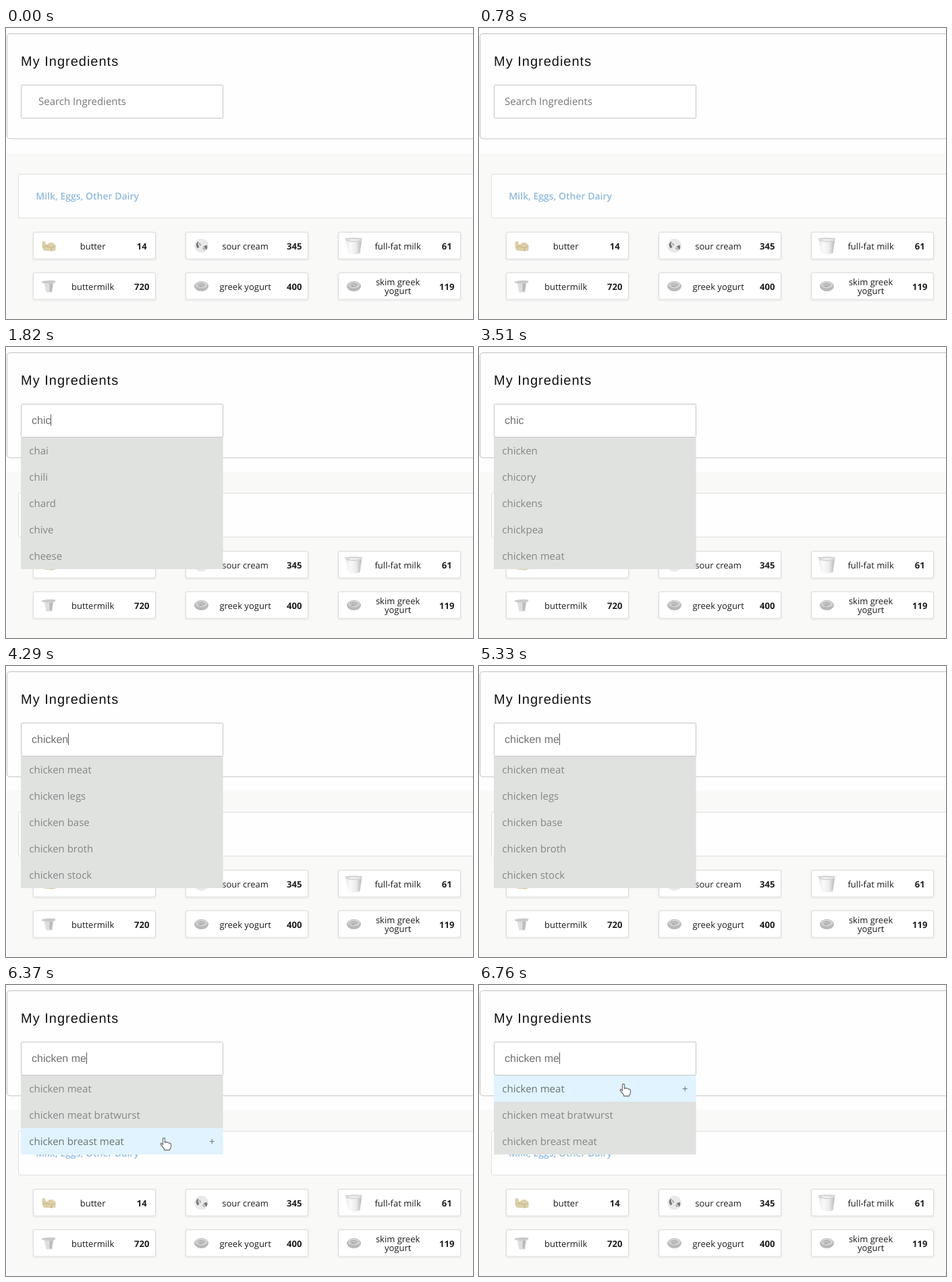
Recreate the animation shown at these times as an HTML page. Size 692 by 431 pixels, loop 6890 ms.

```html
<!DOCTYPE html>
<html lang="en">
<head>
<meta charset="utf-8">
<title>My Ingredients</title>
<style>
  html, body { margin: 0; width: 100%; height: 100%; overflow: hidden; background: #fefefe; }
  svg { display: block; font: 15px "Open Sans", sans-serif; text-rendering: geometricPrecision; }
  text { white-space: pre; }
  .heading { font: 20px "Liberation Sans", Arial, sans-serif; letter-spacing: 1px; fill: #111; }
  .typed { font: 16px "Liberation Sans", Arial, sans-serif; fill: #707070; }
  .placeholder { fill: #777; }
  .section { font-size: 14px; font-weight: 600; fill: #8fb9dc; }
  .tile text { font-size: 13px; fill: #1c1c1c; text-anchor: middle; }
  .tile .count { font-weight: 700; }
  .tile .card { fill: #fff; stroke: #dcdcdc; }
  .shade { fill: #000; opacity: .035; }
  #list text { fill: #838785; }
  #list .hover text { fill: #6c7478; }
</style>
</head>
<body>
<svg width="692" height="431" viewBox="0 0 692 431">
  <defs>
    <linearGradient id="glass">
      <stop offset="0" stop-color="#e6e6e6"/>
      <stop offset=".3" stop-color="#fafafa"/>
      <stop offset=".65" stop-color="#ececec"/>
      <stop offset="1" stop-color="#b4b4b4"/>
    </linearGradient>
    <g id="butter">
      <path d="M-10-6L-6-7-4-1 0-4 5-5 10-1V7L4 8-8 7-10 2Z" fill="#dccfa9"/>
      <path d="M-9 2L-3 1 4 3 10 1M4 3V8M-4-1L-3 1" fill="none" stroke="#c3b284"/>
    </g>
    <g id="sour">
      <circle r="10.5" fill="#e9e9e9"/>
      <path d="M-8-1Q-7-6-4-6L-5-2-3 2-6 4ZM3 1L8-1Q10 3 7 6L5 3Z" fill="#777"/>
      <path d="M-3-4L-1 0M2 3L5 6" stroke="#aaa" stroke-width="2"/>
    </g>
    <g id="milk">
      <path d="M-13-11Q0-13 12-11L9 11Q0 15-8 11Z" fill="url(#glass)"/>
      <path d="M-13-11Q0-13 12-11L11-7Q0-4-11-7Z" fill="#d6d6d6"/>
      <path d="M-10-9Q0-10 10-9Q0-6-10-9Z" fill="#f5f5f5"/>
    </g>
    <g id="cup">
      <path d="M-7-6H7L5 9H-4Z" fill="#dedede"/>
      <path d="M-11-7Q0-10 10-8L9-5Q0-3-10-5Z" fill="#cacaca"/>
      <path d="M1-4H6L4 8H1Z" fill="#bbb"/>
    </g>
    <g id="bowl">
      <ellipse rx="10.5" ry="7.5" fill="#b8b8b8"/>
      <ellipse cy="-2" rx="9" ry="5" fill="#d2d2d2"/>
      <path d="M-6-2Q0-6 5-2Q0 2-4 0L1-2" fill="none" stroke="#999"/>
    </g>
  </defs>

  <rect x="1.5" y="8.5" width="720" height="155.5" rx="4" fill="#fefefe" stroke="#c2c2c2"/>
  <text class="heading" x="22" y="56">My Ingredients</text>
  <rect x="22.5" y="84.5" width="299" height="49" rx="1" fill="#fff" stroke="#c4c4c4"/>
  <rect x="1" y="185" width="691" height="246" fill="#f9f9f8"/>
  <rect x="18.5" y="216.5" width="700" height="65" rx="2" fill="#fefefe" stroke="#dedede"/>
  <text class="section" x="44.3" y="254.3">Milk, Eggs, Other Dairy</text>
  <g id="tiles"></g>

  <text class="placeholder" id="placeholder" x="48" y="114.3">Search Ingredients</text>
  <text class="typed" id="typed" x="38" y="114.3"></text>
  <rect id="caret" y="100" width="1" height="17" fill="#555"/>
  <g id="list"></g>
  <path id="hand" d="M-4-7Q-4-9-2.5-9Q-1-9-1-7V-2Q1-4 2-2Q4-3 5-1Q8-2 8 1V4Q8 6 6 8V9H-2V7L-7 1Q-8-1-6-1L-4 1Z"
        fill="#fff" stroke="#777" stroke-width="1.3" stroke-linejoin="round"/>
</svg>
<script>
const LOOP = 6890, STEP = 130, ROW = 39;
const $ = id => document.getElementById(id);

const tiles = [
  ["butter", "butter", 14], ["sour", "sour cream", 345], ["milk", "full-fat milk", 61],
  ["cup", "buttermilk", 720], ["bowl", "greek yogurt", 400], ["bowl", "skim greek|yogurt", 119],
];
$("tiles").innerHTML = tiles.map(([icon, name, count], i) => {
  const lines = name.split("|");
  const label = lines.map((line, k) =>
    `<text x="88.6" y="${25 + (lines.length > 1 ? k * 13 - 6.5 : 0)}">${line}</text>`).join("");
  return `<g class="tile" transform="translate(${40 + i % 3 * 226} ${302.5 + (i > 2 ? 60 : 0)})">
    <rect class="shade" x="-1.5" y="-1" width="185" height="43.5" rx="4"/>
    <rect class="card" x=".5" width="181" height="39.5" rx="3"/>
    <use href="#${icon}" x="23.5" y="20"/>${label}
    <text class="count" x="161.2" y="25">${count}</text></g>`;
}).join("");

const lists = {
  ch: ["chai", "chili", "chard", "chive", "cheese"],
  chic: ["chicken", "chicory", "chickens", "chickpea", "chicken meat"],
  chicken: ["meat", "legs", "base", "broth", "stock"].map(s => "chicken " + s),
  meat: ["chicken meat", "chicken meat bratwurst", "chicken breast meat"],
};

// Each track holds [start time, value] pairs.
const typing = [[0, ""], [1040, "c"], [1170, "ch"], [1560, "chi"], [1690, "chic"],
  [3640, "chick"], [3770, "chicke"], [4030, "chicken"], [4680, "chicken "],
  [4940, "chicken m"], [5070, "chicken me"]];
const suggestions = [[0, ""], [1820, "ch"], [2340, "chic"], [4290, "chicken"], [5720, "meat"]];
const caretOn = [[0, 0], [260, 1], [780, 0], [1040, 1], [2210, 0], [2860, 1], [3510, 0],
  [3640, 1], [4550, 0], [4680, 1], [5590, 0], [6240, 1]];
const at = (track, t) => track.findLast(([start]) => start <= t)[1];
const show = (node, on) => node.setAttribute("visibility", on ? "visible" : "hidden");

function drawList(items, hovered) {
  $("list").innerHTML = items.map((item, i) => {
    const y = 134 + i * ROW, hover = i === hovered;
    return `<g class="${hover ? "hover" : ""}">
      <rect x="22" y="${y}" width="299.6" height="${ROW}" fill="${hover ? "#e0f3fe" : "#e0e2e0"}"/>
      <text x="34.3" y="${y + 25.4}">${item}</text>
      ${hover ? `<text x="301" y="${y + 25.4}">+</text>` : ""}</g>`;
  }).join("");
}

let lastFrame = -1;
function render() {
  const t = Math.floor(performance.now() % LOOP / STEP) * STEP;
  if (t !== lastFrame) {
    lastFrame = t;
    const text = at(typing, t);
    $("typed").textContent = text;
    $("placeholder").setAttribute("x", t < 130 ? 48 : t < 260 ? 43 : 38);
    show($("placeholder"), !text);
    $("caret").setAttribute("x", 38 + Math.round(text ? $("typed").getComputedTextLength() : 0));
    show($("caret"), at(caretOn, t));

    const pointing = t >= 6370;
    const away = (1 - Math.min(1, Math.max(0, (t - 6370) / 390))) ** 2;
    const x = 216.5 + 20 * away, y = 155.5 + 80 * away;
    $("hand").setAttribute("transform", `translate(${x} ${y})`);
    show($("hand"), pointing);
    drawList(lists[at(suggestions, t)] || [], pointing ? Math.floor((y - 134) / ROW) : -1);
  }
  requestAnimationFrame(render);
}
render();
</script>
</body>
</html>
```
